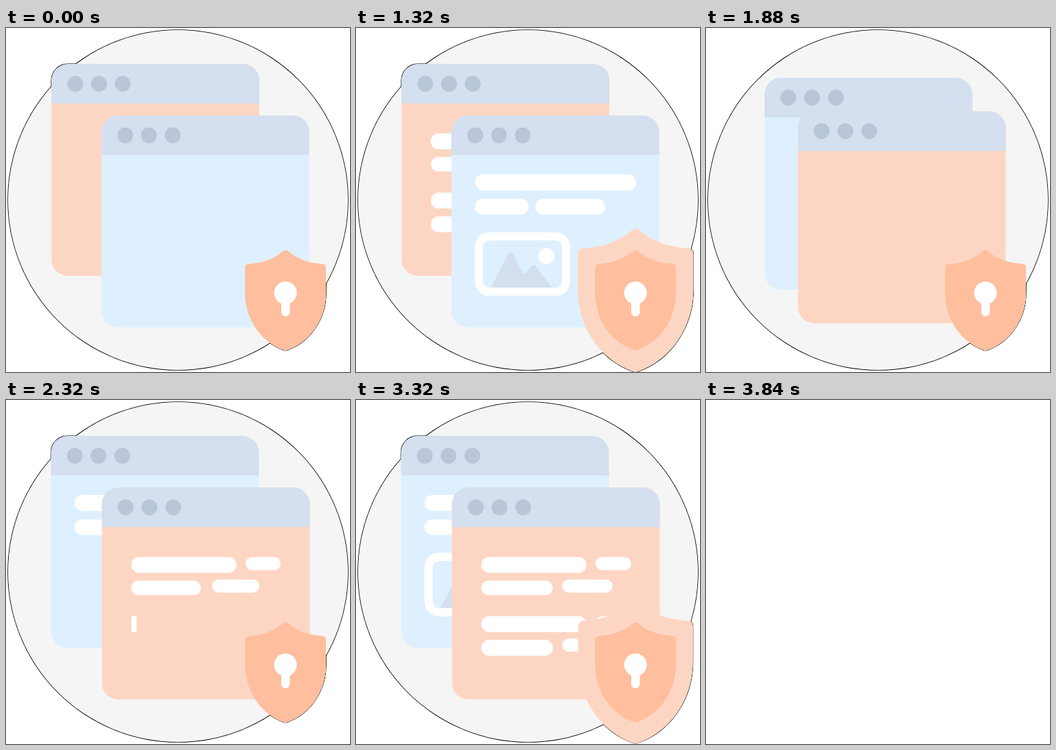
Animation of 500 by 500 pixels, one loop 3.88 s. Source, as an HTML page with a canvas:

```html
<!DOCTYPE html>
<html lang="en">
<head>
<meta charset="utf-8">
<title>Secure windows</title>
<style>
  html, body { margin: 0; width: 100%; height: 100%; overflow: hidden; background: #fff; }
  canvas { display: block; width: 500px; height: 500px; }
</style>
</head>
<body>
<canvas id="stage" width="500" height="500"></canvas>
<script>
const ctx = document.getElementById('stage').getContext('2d');

const LOOP = 3880, HALF = LOOP / 2, BLANK = 3840;
const SWAP_OUT = 1797, SWAP_BACK = 3688;
const W = 302, H = 308, BAR = 57.5, R = 24;
const WHITE = '#fff', GREY = '#f5f5f5', PEACH = '#fdd6c3', BLUE = '#def0ff',
      STEEL = '#d4dfef', DOT = '#b9c6d7', CORAL = '#ffbe9d', PALE = '#fde8de';

// x, y, width, height, start time
const peachLines = [
  [42.5, 101, 153, 23, 20], [208.5, 101, 52, 19, 88],
  [42.5, 135.3, 104, 21, 95], [160, 133.7, 73.5, 19, 114],
  [42.5, 187, 153, 23, 334], [208.5, 187, 52, 19, 402],
  [42.5, 221.5, 104, 23, 409], [160, 219.5, 73.5, 19, 428]
];
const blueLines = [
  [34.3, 85.6, 234.5, 23.4, 20],
  [34, 121.4, 78, 22.6, 95], [121.5, 121.4, 102, 22.6, 114]
];

const shield = new Path2D(
  'M402.5 324.6Q406.3 321.6 410 324.6C423 336 440 342 460 343Q465 343.5 465 349V385' +
  'C465 422 443 456 409 468Q406.3 469 403.5 468C370 456 347.5 422 347.5 385V349' +
  'Q347.5 343.5 353 343C373 342 390 336 402.5 324.6Z');
const hills = new Path2D(
  'M57 250L82 202Q86 195 90 202L102 226Q105.5 231 109 228L115 220Q119 214 123 220L146 250Z');

const lerp = (a, b, p) => a + (b - a) * p;
function ease(t, start, dur) {
  const p = Math.min(1, Math.max(0, (t - start) / dur));
  return (1 - Math.cos(Math.PI * p)) / 2;
}

function at(x, y, sx, sy, draw) {
  ctx.save();
  ctx.translate(x, y);
  ctx.scale(sx, sy);
  draw();
  ctx.restore();
}

function box(x, y, w, h, r, color) {
  ctx.beginPath();
  ctx.roundRect(x, y, w, h, r);
  ctx.fillStyle = color;
  ctx.fill();
}

function disc(x, y, r, color) {
  ctx.beginPath();
  ctx.arc(x, y, r, 0, Math.PI * 2);
  ctx.fillStyle = color;
  ctx.fill();
}

function drawLines(list, clock) {
  for (const [x, y, w, h, start] of list) {
    const p = ease(clock, start, 320);
    if (p > 0) at(x, y, p, 1, () => box(0, 0, w, h, h / 2, WHITE));
  }
}

function drawPicture(clock) {
  const s = ease(clock, 430, 360);
  if (s <= 0) return;
  at(103, 216, s, s, () => {
    ctx.translate(-103, -216);
    ctx.fillStyle = STEEL;
    ctx.fill(hills);
    disc(138, 204.3, 11.7, WHITE);
    ctx.beginPath();
    ctx.roundRect(40, 175.7, 126.5, 80.5, 15);
    ctx.lineWidth = 11.8;
    ctx.strokeStyle = WHITE;
    ctx.stroke();
  });
}

function drawWindow(win, clock) {
  at(win.x, win.y, 1, 1, () => {
    box(0, 0, W, H, R, win.color);
    box(0, 0, W, BAR, [R, R, 0, 0], STEEL);
    for (let i = 1; i <= 3; i++) disc(34.5 * i, 28.8, 11.5, DOT);
    drawLines(win.lines, clock);
    if (win.picture) drawPicture(clock);
  });
}

function shieldAt(s, paint) {
  at(406.25, 395.8, s, s, () => {
    ctx.translate(-406.25, -395.8);
    paint();
  });
}

function fillShield(s, color) {
  shieldAt(s, () => {
    ctx.fillStyle = color;
    ctx.fill(shield);
  });
}

// Thin dark edge; later fills leave it only along the outer silhouette.
function drawEdge(wins, s) {
  ctx.strokeStyle = '#000';
  ctx.lineWidth = 1.6;
  ctx.beginPath();
  ctx.arc(250, 250, 247, 0, Math.PI * 2);
  ctx.stroke();
  for (const { x, y } of wins) {
    ctx.beginPath();
    ctx.roundRect(x, y, W, H, R);
    ctx.stroke();
  }
  shieldAt(s, () => {
    ctx.lineWidth = 1.4 / s;
    ctx.stroke(shield);
  });
}

function render(t) {
  ctx.fillStyle = WHITE;
  ctx.fillRect(0, 0, 500, 500);
  if (t >= BLANK) return;

  const back = ease(t, 3518, 340);
  const b = ease(t, 1646, 360) - back;
  const p = ease(t, 1587, 360) - back;
  const blue = { x: lerp(138.8, 65.5, b), y: lerp(127.2, 52.3, b),
                 color: BLUE, lines: blueLines, picture: true };
  const peach = { x: lerp(66.2, 139.5, p), y: lerp(52.3, 127.2, p),
                  color: PEACH, lines: peachLines };
  const swapped = t >= SWAP_OUT && t < SWAP_BACK;
  const wins = swapped ? [blue, peach] : [peach, blue];
  const clock = t < SWAP_OUT ? t : swapped ? t - HALF : -1;

  const beat = t % HALF;
  const shrink = 1 - ease(beat, 1360, 200);
  const grow = start => 1 + 0.43 * ease(beat, start, 400) * shrink;

  drawEdge(wins, grow(698));
  disc(250, 250, 247, GREY);
  wins.forEach(w => drawWindow(w, clock));

  fillShield(grow(698), PEACH);
  fillShield(grow(764), PALE);
  fillShield(grow(864), PEACH);
  fillShield(1, CORAL);
  disc(406.2, 385, 16.5, WHITE);
  box(400, 390, 12.6, 29, 6.3, WHITE);
}

const begin = performance.now();
function tick() {
  render((performance.now() - begin) % LOOP);
  requestAnimationFrame(tick);
}
tick();
</script>
</body>
</html>
```
